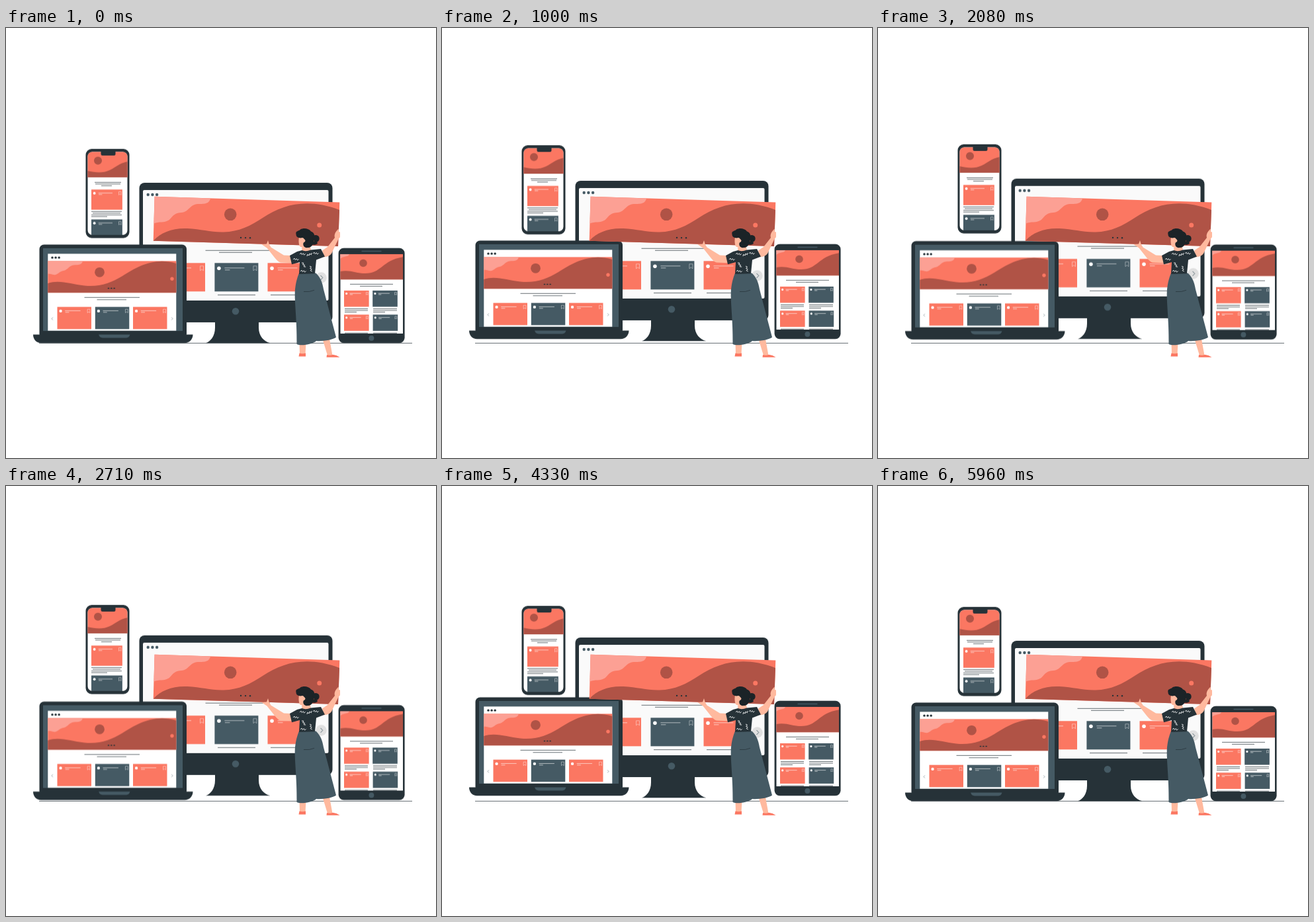
Recreate the animation shown at these times as an HTML page without scripts. Size 650 by 650 pixels, loop 6000 ms.

```html
<!DOCTYPE html>
<html lang="en">
<head>
<meta charset="utf-8">
<title>Responsive design</title>
<style>
  html, body { margin: 0; width: 100%; height: 100%; overflow: hidden; background: #fff; }
  svg { display: block; width: 100%; height: 100%; }
  .float { animation: float 3s linear -20ms infinite; }
  .fast { animation-duration: 1.5s; }
  .slow { animation-duration: 6s; }
  @keyframes float { 50% { transform: translateY(-9px); } }
  .ink { fill: #263238; }
  .slate { fill: #455a64; }
  .coral { fill: #fb7762; }
  .brick { fill: #b05346; }
  .pale { fill: #fca094; }
  .white { fill: #fff; }
  .skin { fill: #ffb99e; }
  .hair { fill: #1b2327; }
  .text { fill: none; stroke: #263238; stroke-width: .7; }
  .mark { fill: none; stroke: #fff; stroke-width: .6; vector-effect: non-scaling-stroke; }
  .arrow { fill: none; stroke: #455a64; stroke-width: .8; }
</style>
</head>
<body>
<svg viewBox="0 0 650 650">
  <defs>
    <g id="card">
      <rect width="66" height="43"/>
      <circle class="white" cx="6.5" cy="8" r="2.8"/>
      <path class="mark" d="M15 7.5H45M15.5 10.5H23"/>
      <path class="mark" opacity=".7" d="M58.5 4.5h5v7l-2.5-2-2.5 2z"/>
    </g>
    <g id="dots">
      <circle r="2.2"/><circle cx="6.7" r="2.2"/><circle cx="13.4" r="2.2"/>
    </g>
    <path id="zig" d="M0 0l2-2 1.3 2.6 2-2 1.3 2.6 2-2"/>
    <clipPath id="phone"><rect x="123.5" y="187.5" width="60" height="125.5" rx="7"/></clipPath>
    <clipPath id="tablet"><rect x="505.5" y="342" width="94.5" height="120"/></clipPath>
  </defs>

  <path class="text" d="M50 476.4H614"/>

  <!-- phone -->
  <g class="float fast">
    <rect class="ink" x="120.5" y="183" width="66" height="134.7" rx="9"/>
    <g clip-path="url(#phone)">
      <rect class="white" x="123" y="187" width="61" height="127"/>
      <rect class="coral" x="123" y="187" width="61" height="39"/>
      <path class="brick" d="M123 216C135 219 147 220 157 215S171 205 184 202V226H123Z"/>
      <circle class="brick" cx="139" cy="200.8" r="6"/>
      <path class="text" d="M134 233.6H174M135 236H173M144 238.7H160M129 277.6H175M131 280.1H173M129 282.8H175M129 285.3H153"/>
      <use class="coral" href="#card" transform="translate(129 244.4) scale(.71)"/>
      <use class="slate" href="#card" transform="translate(129 289.6) scale(.71)"/>
    </g>
    <path class="ink" d="M143.5 186H165.500V190.500Q165.500 193 163 193H146Q143.500 193 143.500 190.500Z"/>
  </g>

  <!-- monitor -->
  <g class="float slow">
    <path class="ink" d="M316 444V453C316 466 309 474 302 476.300H399.500C390 474 382 466 382 453V444Z"/>
    <rect class="ink" x="201.500" y="234" width="292" height="211" rx="8"/>
    <rect x="207" y="245" width="280.500" height="167" rx="2" fill="#fafafa"/>
    <use class="slate" href="#dots" x="214.700" y="252"/>
    <circle class="slate" cx="347" cy="428.200" r="5.300"/>
    <path class="text" d="M301.500 336.300H399M322 339.300H372M320 403.600H377M400 403.600H457"/>
    <use class="coral" href="#card" x="235" y="355.300"/>
    <use class="slate" href="#card" x="315.400" y="355.300"/>
    <use class="coral" href="#card" x="395.500" y="355.300"/>
    <circle cx="476.500" cy="377.500" r="8.200" fill="#e0e0e0"/>
    <path class="arrow" d="M475.500 374l3.300 3.500-3.300 3.500"/>
  </g>

  <!-- laptop -->
  <g class="float">
    <rect class="ink" x="50.500" y="327.400" width="222.500" height="142" rx="7"/>
    <rect class="slate" x="56" y="333" width="211" height="125"/>
    <rect class="white" x="63.300" y="341.400" width="194" height="116.300"/>
    <use class="ink" href="#dots" transform="translate(70 347.200) scale(.76)" style="transform-box:view-box"/>
    <rect class="coral" x="63.300" y="352.400" width="194" height="47.800"/>
    <path class="pale" d="M63.300 352.400H116C114 360 106 357 100 359S93 366 87 367 79 372 75 373 68 371 63.300 372Z"/>
    <path class="brick" d="M63.300 386C80 380 98 387 118 389.500C141 392 158 386 176 375C198 361 224 346 257.300 356V400.200H63.300Z"/>
    <circle class="brick" cx="141.500" cy="369.300" r="7.400"/>
    <circle class="coral" cx="251" cy="379.200" r="2.700"/>
    <use class="ink" href="#dots" transform="translate(155 393.500) scale(.38) scale(1.700 1)"/>
    <path class="text" d="M118.500 407.400H202M137.500 410.800H182"/>
    <use class="coral" href="#card" transform="translate(77.500 421.700) scale(.78)"/>
    <use class="slate" href="#card" transform="translate(134.800 421.700) scale(.78)"/>
    <use class="coral" href="#card" transform="translate(192 421.700) scale(.78)"/>
    <path class="arrow" opacity=".6" d="M70.800 437.500l-1.800 2 1.800 2M250.200 437.500l1.800 2-1.800 2"/>
    <path class="ink" d="M41 463.600H282.500C282.500 471 277 476.300 270 476.300H53C46 476.300 41 471 41 463.600Z"/>
    <path class="slate" d="M140 463.600H187.500Q186 468.500 182 468.500H146Q141.500 468.500 140 463.600Z"/>
  </g>

  <!-- tablet -->
  <g class="float">
    <rect class="ink" x="502.600" y="332.700" width="100" height="143.600" rx="8"/>
    <path d="M538 337.500H567" stroke="#455a64" stroke-width="1.400" stroke-linecap="round"/>
    <circle class="slate" cx="552.400" cy="469" r="4"/>
    <g clip-path="url(#tablet)">
      <rect class="white" x="505" y="342" width="96" height="121"/>
      <rect class="coral" x="505" y="342" width="96" height="38.200"/>
      <path class="pale" d="M505 342H519Q518 345 513 345.500T505 349Z"/>
      <path class="brick" d="M505 368C520 365 529 371 543 371C568 371 568 351 601 346V380.200H505Z"/>
      <circle class="brick" cx="540" cy="355.500" r="5.800"/>
      <path class="text" d="M520 387.400H585M535 390.400H569M512 424.500H547M512 427H547M512 429.500H530M555 424.500H591M555 427H591M555 429.500H573M512 461.200H547M555 461.200H591"/>
      <use class="coral" href="#card" transform="translate(511 397) scale(.57)"/>
      <use class="slate" href="#card" transform="translate(554.200 397) scale(.57)"/>
      <use class="coral" href="#card" transform="translate(511 433.400) scale(.57)"/>
      <use class="slate" href="#card" transform="translate(554.600 433.400) scale(.57)"/>
    </g>
  </g>

  <!-- banner -->
  <path class="coral" d="M224.600 254.700L504.300 263.500 502 330 222.700 321.700Z"/>
  <path class="pale" d="M224.600 254.700L309 257.400C307 267 298 265.500 290 266C277 267 277 278 265 279C252 280 252 286 246 290.500C239 295 231 292 223.500 295.500Z"/>
  <path class="brick" d="M222.700 321.700C234 309 252 302 274 303C296 304 309 309 329 308.500C352 308 370 299 388 287C420 266 456 257 504 275L502 330Z"/>
  <circle class="brick" cx="339.200" cy="281.800" r="9.300"/>
  <circle class="coral" cx="473.700" cy="298" r="3.500"/>
  <g class="ink">
    <circle cx="355" cy="316.900" r="1.200"/><circle cx="362" cy="317.100" r="1.200"/><circle cx="369" cy="317.300" r="1.200"/>
  </g>

  <!-- woman -->
  <path class="skin" d="M443.500 476H453.500L452.500 493H444ZM479 472L489 470 493.500 495H486Z"/>
  <path class="coral" d="M443.500 491.500Q448 493 453 491.500L453 496.500H442.500ZM485 494Q490 495.500 494 493.800Q500 494.500 504.500 497.700H484.500Z"/>
  <path class="skin" d="M386.500 327.300L394 326.500 396 321 397.600 326.500 400.500 331.500 420 343.500 431 344 433 355.300 415 354.500Q411 353.500 406 347L394.500 332.500Z"/>
  <path class="skin" d="M478 336.500L486 331 497 317C495.500 311 499 307.500 502.500 303.500L503 308 505 308.500 505 316 502 320 492 341Q489 345.500 480 346.500Z"/>
  <path class="skin" d="M448 324L459 327 461 336Q454 341 447 336.500Z"/>
  <path class="slate" d="M443 370.500H468.500C476 378 478 384 480 395L499 467.500C494 471.500 478 474 469 473C463 478.500 446 481 439.500 478C440 441 435.500 412 437 395C438 385 440 378 443 370.500Z"/>
  <path class="text" d="M450 398.500Q459 399.500 466 396.300"/>
  <path class="ink" d="M440 338L447.500 336Q453 338.500 460.500 335.500L476 334 482 345.500 469 350.500 467 371.300 443 372 444 354 432 357.200 429 344Z"/>
  <g fill="none" stroke="#fff" stroke-width=".8">
    <use href="#zig" x="434" y="350"/>
    <use href="#zig" x="444" y="342"/>
    <use href="#zig" transform="translate(455 345) rotate(-30)"/>
    <use href="#zig" x="464" y="341"/>
    <use href="#zig" transform="translate(447 355) rotate(50)"/>
    <use href="#zig" transform="translate(459 360) rotate(70)"/>
    <use href="#zig" x="445" y="368"/>
  </g>
  <path class="skin" d="M443.500 314C442 320 442 327 444.500 330.500Q448 332.500 453 331L461 326V314Z"/>
  <path class="hair" d="M438.500 312C437 306 443 307.500 445 304.500C450 301.500 458 303 461 307.500C466 309 467.500 314 465.500 319C466 325 462 332.500 456.500 332C451 333 448.500 329 449.500 325C453 322 451 317.500 448 317C443 318.500 438.500 316 438.500 312Z"/>
  <path class="hair" d="M463 317C464 312 471 312 473 315.500C475 320 472 323 470 323.500C473 326 468 329 462 327L466 322Z"/>
  <circle class="skin" cx="450.200" cy="321.500" r="2.200"/>
</svg>
</body>
</html>
```
